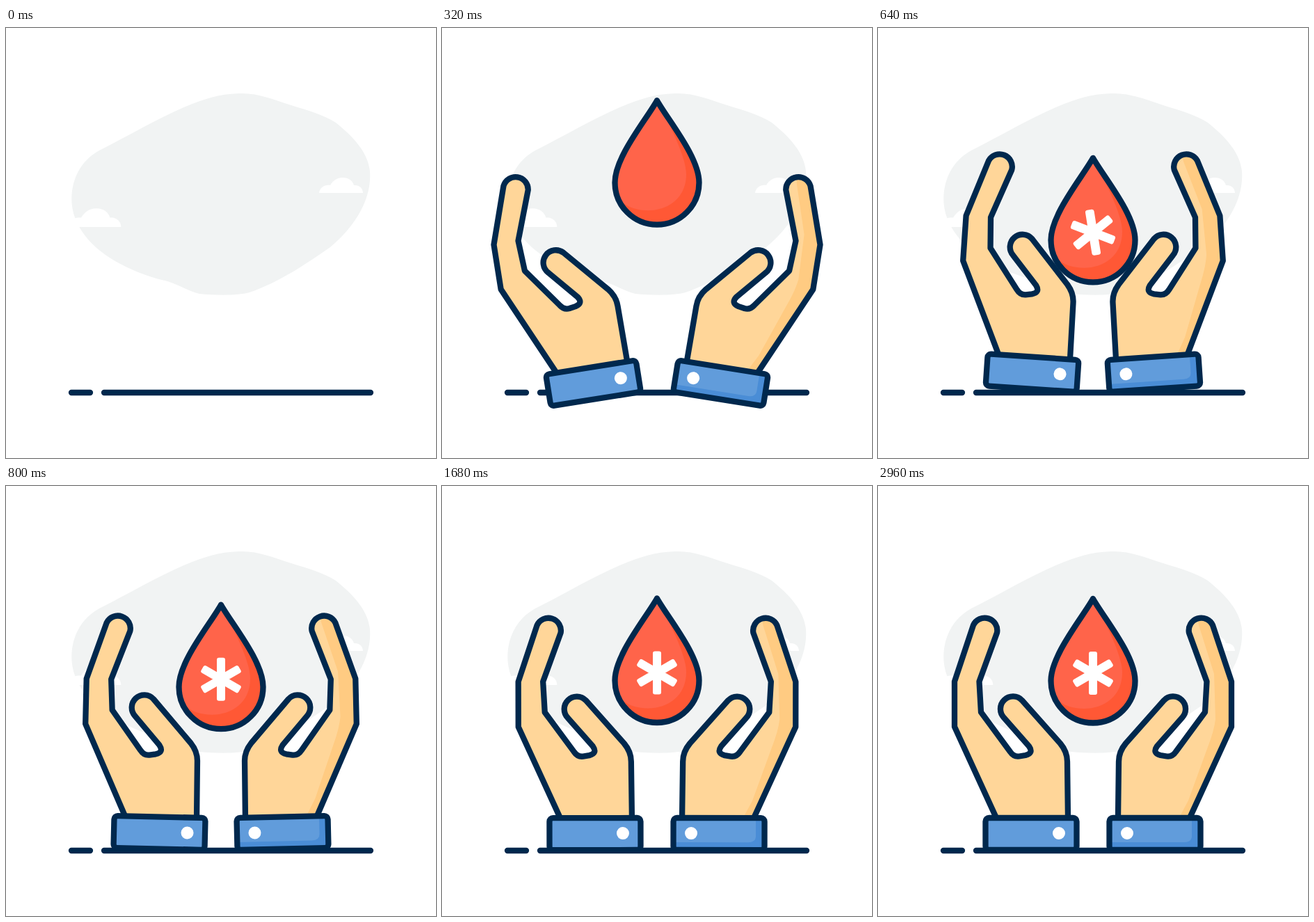
An HTML page that plays this animation: 618 by 618 pixels, repeating every 3040 ms.

```html
<!DOCTYPE html>
<html lang="en">
<head>
<meta charset="utf-8">
<title>Hands and drop</title>
<style>
  html, body { margin: 0; width: 100%; height: 100%; overflow: hidden; background: #fff; }
  svg { display: block; width: 100%; height: 100%; }
  .ink { fill: none; stroke: #00284d; stroke-width: 8.3; stroke-linecap: round; stroke-linejoin: round; }
  .skin { fill: #ffd699; }
  .skin-shade { fill: #ffcb82; }
  .cuff { fill: #619cdb; }
  .cuff-shade { fill: #4a8dd6; }
  .white { fill: #fff; }
</style>
</head>
<body>
<svg viewBox="0 0 618 618">
  <defs>
    <path id="hand" d="M170 477 L110 346 V281 L137 200 A18 18 0 0 1 171 211 L145.5 281 L148 325
      L190 382 Q195 389.5 203 388.5 L212 387 Q224 384 217 374 L181 333 A18 18 0 0 1 207 308
      L262 370 Q272 382 272 396 L273 477"/>
    <rect id="cuff" x="154.5" y="477" width="131" height="46" rx="5"/>
    <path id="drop" d="M309 162 C294 189 248.5 243 248.5 280 A60.5 60.5 0 0 0 369.5 280
      C369.5 243 324 189 309 162Z"/>
    <path id="cloud" class="white" d="M-34 0 C-33 -7 -27 -12 -18 -11 C-14 -18 -8 -22 0 -22
      C8 -22 14 -18 16 -11 C24 -12 29 -6 29 0Z"/>
    <rect id="bar" x="-6" y="-31" width="12" height="62" rx="3"/>
    <clipPath id="handClip"><use href="#hand"/></clipPath>
    <clipPath id="cuffClip"><use href="#cuff"/></clipPath>
    <clipPath id="dropClip"><use href="#drop"/></clipPath>
  </defs>

  <path fill="#f1f3f3" d="M335 94 C362 93 385 103 410 111 S455 124 474 136 C494 152 520 176 523 206
    C526 248 500 286 466 315 C436 336 392 366 350 380 C332 385 300 384 278 382
    C262 378 250 370 232 364 C196 356 146 336 118 304 C98 280 92 258 95 234
    C99 208 112 186 140 173 C176 155 218 130 258 113 C285 102 305 95 335 94Z"/>
  <use href="#cloud" transform="translate(130 286) scale(1.22)"/>
  <use href="#cloud" transform="translate(484 237)"/>
  <path class="ink" d="M94 524 H121 M141 524 H524"/>

  <g id="actors">
    <g id="fall">
      <use href="#drop" fill="#ff5835"/>
      <path clip-path="url(#dropClip)" fill="#ff644a" d="M309 155 C322 190 351 240 351 268
        C351 302 325 320 296 320 C280 320 266 315 256 306 L230 280 V155Z"/>
      <use href="#drop" class="ink"/>
      <g id="star" class="white">
        <use href="#bar"/>
        <use href="#bar" transform="rotate(60)"/>
        <use href="#bar" transform="rotate(120)"/>
      </g>
    </g>

    <g class="arm">
      <use href="#hand" class="skin"/>
      <use href="#hand" class="ink"/>
      <use href="#cuff" class="cuff"/>
      <use href="#cuff" class="ink"/>
      <circle class="white" cx="260" cy="499" r="9"/>
    </g>

    <g transform="translate(618 0) scale(-1 1)">
      <g class="arm">
        <use href="#hand" class="skin"/>
        <path class="skin-shade" clip-path="url(#handClip)"
          d="M160 180 L157 200 L135 270 L133 335 Q135 352 144 375 L172 452 L187 480 H90 V180Z"/>
        <use href="#hand" class="ink"/>
        <use href="#cuff" class="cuff"/>
        <path class="cuff-shade" clip-path="url(#cuffClip)"
          d="M167 470 V503 Q167 512 178 512 H290 V530 H150 V470Z"/>
        <use href="#cuff" class="ink"/>
        <circle class="white" cx="260" cy="499" r="9"/>
      </g>
    </g>
  </g>
</svg>
<script>
  const LOOP = 3040, STEP = 80;
  const START = 140, PEAK = 515, HIGH = -145, LOW = 41;

  const $ = id => document.getElementById(id);
  const arms = document.querySelectorAll('.arm');
  const ease = f => (1 - Math.cos(Math.PI * Math.min(1, Math.max(0, f)))) / 2;

  // Eased value between [time, value] pairs
  function between(t, keys) {
    let value = keys[0][1];
    for (let i = 1; i < keys.length; i++) {
      const [t0, a] = keys[i - 1], [t1, b] = keys[i];
      if (t >= t0) value = a + (b - a) * ease((t - t0) / (t1 - t0));
    }
    return value;
  }

  // Vertical drop offset: swing past the rest place, then a damped spring
  function swing(t) {
    if (t < PEAK) return HIGH + (LOW - HIGH) * ease((t - START) / (PEAK - START));
    const s = t - PEAK;
    return LOW * Math.exp(-0.0032 * s) * Math.cos(0.00357 * s);
  }

  function draw(t) {
    const y = swing(t);
    const turn = between(t, [[360, -31], [800, 0], [1120, 7], [1600, 0]]);
    const size = between(t, [[370, 0], [640, 1.06], [800, 1]]);
    $('actors').setAttribute('opacity', Math.min(1, t / 160));
    $('fall').setAttribute('transform', `translate(0 ${y})`);
    $('star').setAttribute('transform', `translate(309 269) rotate(${turn}) scale(${size})`);
    arms.forEach(arm => arm.setAttribute('transform', `rotate(${y / 6.4} 285 521)`));
  }

  const begin = performance.now();
  function tick() {
    const t = (performance.now() - begin) % LOOP;
    draw(Math.floor(t / STEP) * STEP);
    requestAnimationFrame(tick);
  }
  tick();
</script>
</body>
</html>
```
